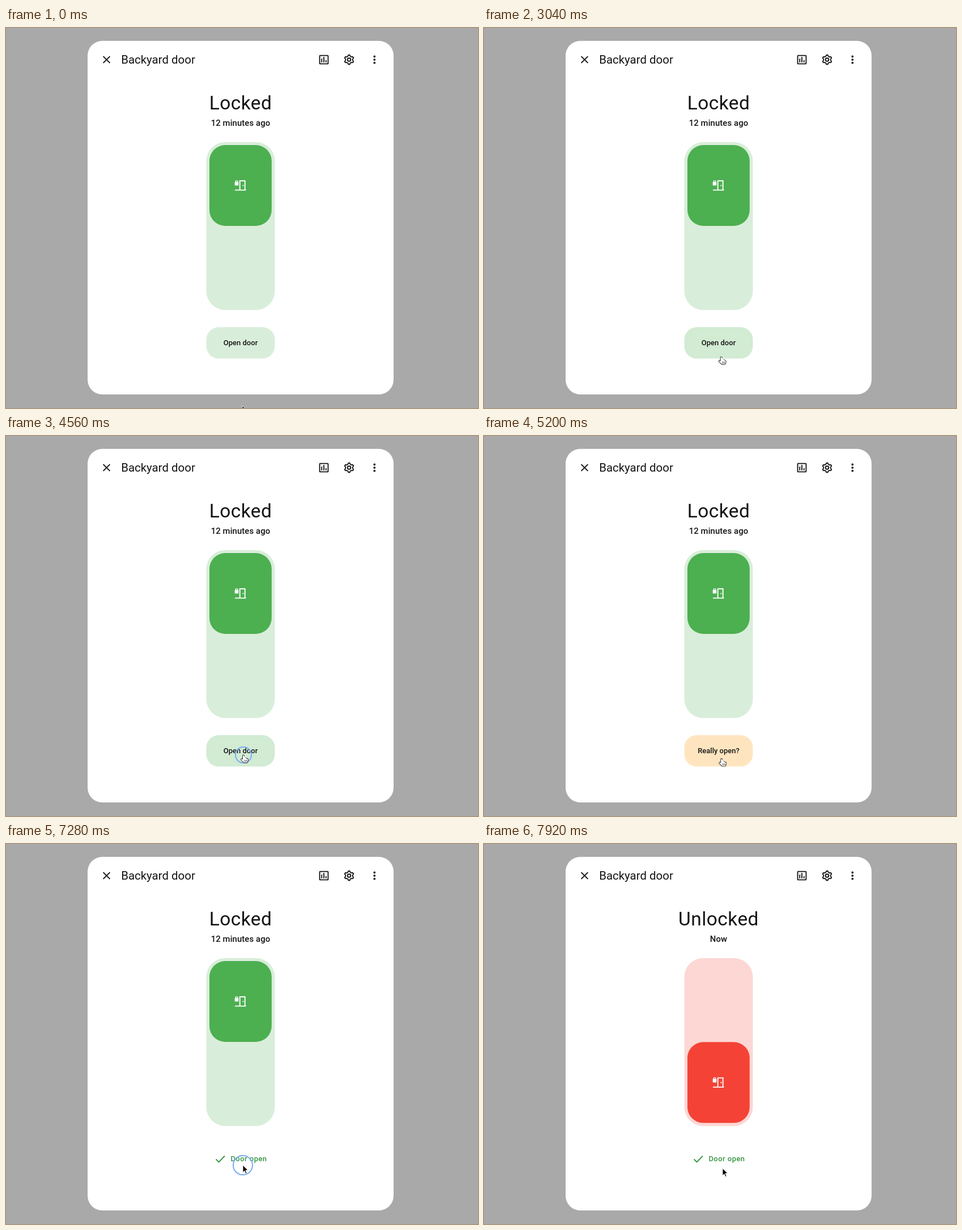
Write an HTML page that moves like this. It is 833 px wide and 672 px high and loops after 8 s.

```html
<!DOCTYPE html>
<html lang="en">
<head>
<meta charset="utf-8">
<title>Door lock dialog</title>
<style>
  html, body { margin: 0; width: 100%; height: 100%; overflow: hidden; background: #a9a9a9; }
  svg { display: block; width: 833px; height: 672px; }
  text { font-family: Roboto, sans-serif; fill: #141414; }
  .middle { text-anchor: middle; }
  .label { font-size: 13px; font-weight: 500; }
  .line { fill: none; stroke: #141414; stroke-width: 2; }
  .round { stroke-linecap: round; stroke-linejoin: round; }
  .done { fill: #339540; }
</style>
</head>
<body>
<svg viewBox="0 0 833 672">
  <rect width="833" height="672" fill="#a9a9a9"/>
  <rect x="144" y="22.7" width="540" height="625.3" rx="26" fill="#fff"/>

  <path class="line" d="M171.6 50.1l11.8 11.8m0-11.8l-11.8 11.8"/>
  <text x="203.2" y="63" font-size="20.46">Backyard door</text>
  <g transform="translate(561 56) scale(.93)">
    <rect class="line" x="-8" y="-8" width="16" height="16" rx="1"/>
    <path class="line" d="M-4 5V-2M0 5V-5M4 5V1"/>
  </g>
  <g transform="translate(605.5 56) scale(.93)">
    <path id="gear" class="line round"/>
    <circle class="line" r="3"/>
  </g>
  <path class="line round" d="M650.3 50.4v11.3" style="stroke-width:3.8" stroke-dasharray="0 5.6"/>

  <text id="state" class="middle" x="414" y="144" font-size="33.5" letter-spacing=".45"></text>
  <text id="since" class="middle" x="414" y="173" font-size="14.9" font-weight="500" letter-spacing=".1"></text>

  <rect id="track" x="353.5" y="201.7" width="121" height="297" rx="33.5" fill-opacity=".21"/>
  <g id="handle">
    <rect x="359" y="207" width="109.8" height="143" rx="28"/>
    <g transform="translate(413.7 278.3)" fill="none" stroke="#fff" stroke-width="1.9">
      <path d="M-9.7 8.3H9.8M-1 8.3V-8H8V8.3"/>
      <circle cx="-6.7" cy="-6.6" r="1.9" stroke-width="1.2"/>
      <rect x="-10" y="-6.3" width="6.6" height="6.4" rx="1" fill="#fff" stroke="none"/>
      <circle cx="4.7" cy=".3" r="1.1" fill="#fff" stroke="none"/>
    </g>
  </g>

  <g id="button">
    <rect id="buttonFill" x="353.5" y="529" width="121" height="55.6" rx="22"/>
    <text id="buttonText" class="middle label" x="414" y="561"></text>
  </g>
  <g id="done">
    <path class="line" d="M370.6 557.4l5 5L386 551.6" style="stroke:#339540"/>
    <text class="label done" x="396.4" y="561" letter-spacing=".46">Door open</text>
  </g>

  <circle id="ripple" fill="none" stroke="#7aadf1" stroke-width="2"/>
  <path id="arrow" d="M0 0V13l3-3 2 5 2-1-2-5h4Z" stroke="#fff" stroke-width=".9"/>
  <g id="hand" class="round" fill="#fff">
    <g stroke="#222" stroke-width="3.8"><path id="fingers" d="M0 1.5V10H7V8M2.5 6V10M5 7V10M-3 8L1.5 12.5H6L7 10"/></g>
    <use href="#fingers" stroke="#fff" stroke-width="2"/>
    <path d="M2 9v3m2-3v3m2-3v3" stroke="#222" stroke-width=".7"/>
  </g>
</svg>

<script>
const LOOP = 8000, STEP = 80;
const CONFIRM = 4640, OPENED = 7260, UNLOCK = 7357;
const CLICKS = [4480, 7160], RIPPLE = 480;
const GREEN = [76, 175, 80], RED = [244, 67, 54], ORANGE = [255, 152, 0];

const START = { x: 417, y: 668 };
const GLIDES = [
  { at: 2000, length: 1400, x: 419, y: 564 },   // up to the button
  { at: 5150, length: 240, x: 421, y: 619 },    // away
  { at: 5720, length: 900, x: 418, y: 568 },    // back to confirm
  { at: 7600, length: 320, x: 421, y: 573.5 }
];

const el = Object.fromEntries([...document.querySelectorAll("[id]")].map(e => [e.id, e]));
const mix = (a, b, p) => a + (b - a) * p;
const ease = (t, start, length) => {
  const p = Math.min(1, Math.max(0, (t - start) / length));
  return p * p * (3 - 2 * p);
};
const blend = (a, b, p) => `rgb(${a.map((v, i) => Math.round(mix(v, b[i], p)))})`;
const show = (node, on) => node.style.display = on ? "" : "none";
const set = (node, attributes) => {
  for (const name in attributes) node.setAttribute(name, attributes[name]);
};

function pointerAt(t) {
  return GLIDES.reduce((from, to) => {
    const p = ease(t, to.at, to.length);
    return { x: mix(from.x, to.x, p), y: mix(from.y, to.y, p) };
  }, START);
}

function gearPath() {
  const corners = [];
  for (let i = 0; i < 24; i++) {
    const outer = i % 4 === 1 || i % 4 === 2;
    const angle = (i * 15 - 22.5) * Math.PI / 180;
    const radius = outer ? 9 : 6.7;
    corners.push([radius * Math.sin(angle), -radius * Math.cos(angle)]);
  }
  return `M${corners.join("L")}Z`;
}

function drawRipple(t, { x, y }) {
  const start = CLICKS.find(c => t >= c && t < c + RIPPLE);
  show(el.ripple, start !== undefined);
  if (start === undefined) return;
  const left = 1 - (t - start) / RIPPLE;
  set(el.ripple, { cx: x, cy: y, r: mix(30, 7, left ** 2), opacity: Math.min(1, 2.4 * left) });
}

function draw(t) {
  const pointer = pointerAt(t);
  const opened = t >= OPENED, unlocked = t >= UNLOCK;
  const hover = pointer.y < 584 && !opened;

  el.state.textContent = unlocked ? "Unlocked" : "Locked";
  el.since.textContent = unlocked ? "Now" : "12 minutes ago";

  const slide = ease(t, UNLOCK, 180);
  const color = blend(GREEN, RED, slide);
  set(el.track, { fill: color });
  set(el.handle, { fill: color, transform: `translate(0 ${143.3 * slide})` });

  show(el.button, !opened);
  show(el.done, opened);
  set(el.buttonFill, {
    fill: blend(GREEN, ORANGE, ease(t, CONFIRM - 40, 180)),
    "fill-opacity": hover ? .25 : .21
  });
  el.buttonText.textContent = t >= CONFIRM ? "Really open?" : "Open door";

  drawRipple(t, pointer);
  show(el.hand, hover);
  show(el.arrow, !hover);
  set(hover ? el.hand : el.arrow, { transform: `translate(${pointer.x} ${pointer.y})` });
}

set(el.gear, { d: gearPath() });
const began = performance.now();
function tick() {
  const t = (performance.now() - began) % LOOP;
  draw(Math.floor(t / STEP) * STEP);
  requestAnimationFrame(tick);
}
tick();
</script>
</body>
</html>
```
